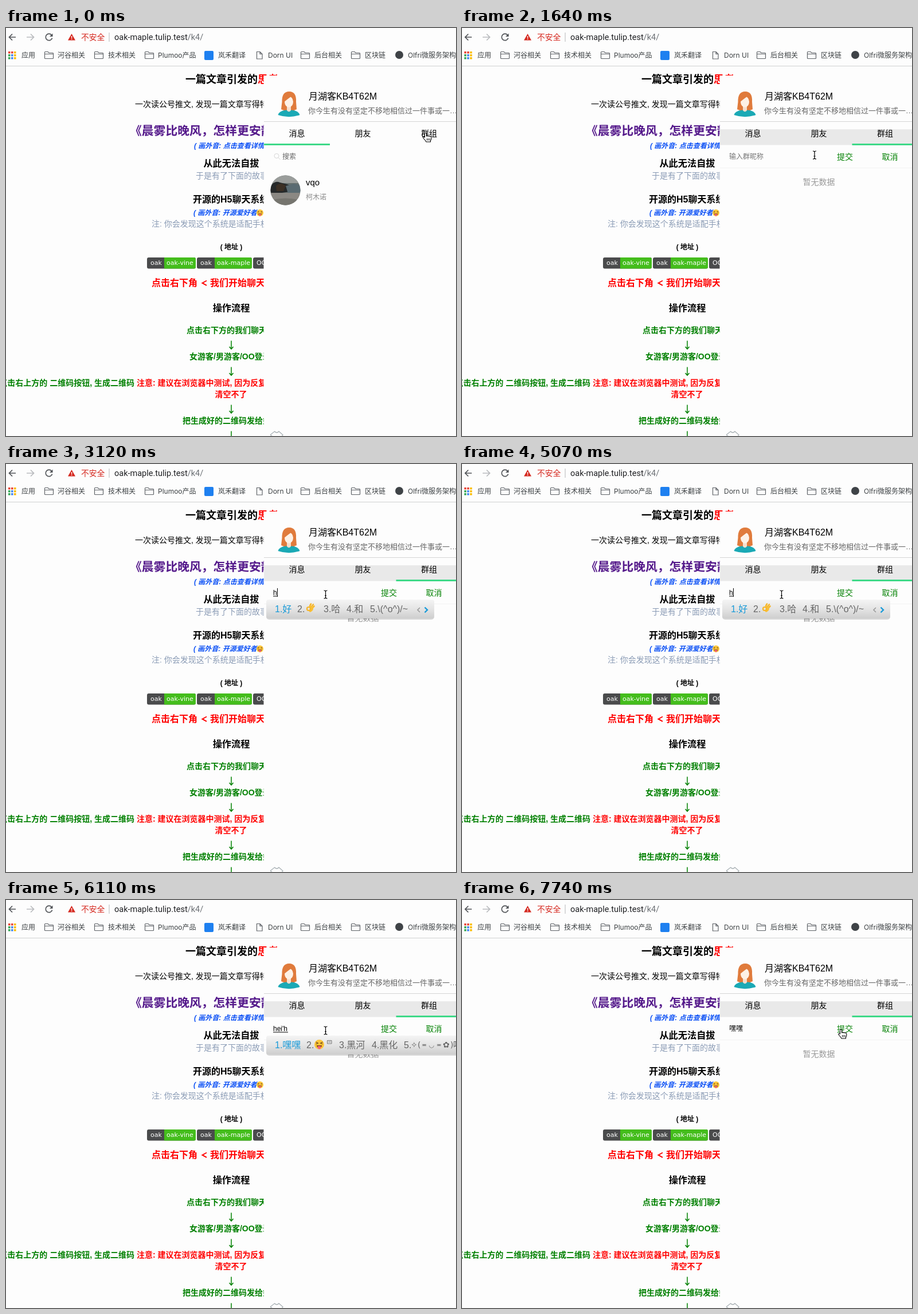
Animation of 785 by 713 pixels, one loop 8 s. Source, as an HTML page:

```html
<!DOCTYPE html>
<html lang="zh-CN">
<head>
<meta charset="utf-8">
<title>Group chat</title>
<style>
  html, body { margin: 0; width: 100%; height: 100%; overflow: hidden; background: #fdfdfd; }
  svg { display: block; width: 785px; height: 713px;
    font-family: "Liberation Sans", "Noto Sans CJK SC", "Noto Sans CJK", sans-serif; }
</style>
</head>
<body>
<svg id="stage" viewBox="0 0 785 713" xmlns="http://www.w3.org/2000/svg"></svg>
<script>
const LOOP = 8000;
const GREEN = '#008000', RED = '#ff0000', BLUE = '#0a4ff5', SLATE = '#8a9bb5';
const font = name => `font-family="${name}, Noto Sans CJK SC, Noto Sans CJK, sans-serif"`;
const BOLD = 'font-weight="700"', MID = 'text-anchor="middle"';

// Text placed by its left edge (or middle) and vertical centre.
const text = (x, cy, size, str, fill = '#000', extra = '') =>
  `<text x="${x}" y="${(cy + size * 0.34).toFixed(1)}" font-size="${size}" fill="${fill}" ${extra}>${str}</text>`;
const bold = (x, cy, size, str, fill, extra = '') => text(x, cy, size, str, fill, `${BOLD} ${extra}`);
const rect = (x, y, w, h, fill, extra = '') =>
  `<rect x="${x}" y="${y}" width="${w}" height="${h}" fill="${fill}" ${extra}/>`;
const circle = (x, y, r, fill) => `<circle cx="${x}" cy="${y}" r="${r}" fill="${fill}"/>`;
const path = (d, fill, extra = '') => `<path d="${d}" fill="${fill}" ${extra}/>`;
const line = (d, stroke, width = 1, extra = '') =>
  path(d, 'none', `stroke="${stroke}" stroke-width="${width}" ${extra}`);
const group = (id, body) => `<g id="${id}">${body}</g>`;

const folder = x =>
  line(`M${x + .5} 42.5q0-1 1-1h4.5l2 2h6.5q1 0 1 1v8q0 1-1 1h-13q-1 0-1-1zM${x + .5} 45.5h15`, '#5f6368', 1.2);

const grin = (x, y, r) => `<g transform="translate(${x} ${y}) scale(${r / 8})">` +
  circle(0, 0, 8, '#fcc63a') +
  line('M-5.500-4l3.500 1.800-3.500 1.500M5.500-4l-3.500 1.800 3.500 1.500', '#6b4516', 1) +
  path('M-4.500 1.500h9q-.8 4-4.500 4t-4.500-4z', '#80431c') +
  path('M-2.500 2.500h5v3.500q-2.500 3-5 0z', '#f2637a') + '</g>';

const okHand = (x, y) =>
  line(`M${x - 1} ${y - 4}l2-3.5M${x + 2} ${y - 3}l3-3.5M${x + 4} ${y - 1}l2.5-2.5`, '#f6b62b', 2.6, 'stroke-linecap="round"') +
  path(`M${x - 1} ${y - 5}L${x + 5} ${y - 2}Q${x + 6} ${y + 5} ${x - 1} ${y + 7}L${x - 4} ${y + 3}z`, '#f9bf35') +
  `<circle cx="${x - 3}" cy="${y + 1}" r="3" fill="#e5e5e5" stroke="#f6b62b" stroke-width="2.2"/>`;

function toolbar() {
  const appColors = ['#ea4335', '#ea4335', '#fbbc05', '#34a853', '#4285f4', '#fbbc05', '#34a853', '#4285f4', '#fbbc05'];
  const apps = appColors.map((c, i) => rect(4 + i % 3 * 5, 41 + Math.floor(i / 3) * 5, 3.5, 3.5, c)).join('');
  const label = (x, str) => text(x, 47.5, 12, str, '#3c4043', font('Inter'));
  return rect(0, 0, 785, 67, '#fdfdfd') +
    line('M17 16H6M11 10.5L5.5 16l5.5 5.5', '#505357', 1.7) +
    line('M36 16h12M43 10.5l5.5 5.5-5.5 5.5', '#b9bbbe', 1.7) +
    line('M79.5 12.2A5.8 5.8 0 1 0 80.6 17.5', '#505357', 1.7) + path('M81.5 9.5v5.5h-5.5z', '#505357') +
    path('M114.5 10l6.5 11.5h-13z', '#d5281f') + rect(113.8, 14, 1.5, 3.6, '#fff') + rect(113.8, 18.6, 1.5, 1.4, '#fff') +
    text(131, 16, 13.8, '不安全', '#d5281f') + rect(179.5, 8, 1, 16, '#b5b7ba') +
    text(189, 16, 14.5, 'oak-maple.tulip.test<tspan fill="#6b6f74">/k4/</tspan>', '#202124', font('Roboto')) +
    apps + label(27, '应用') +
    [67, 154, 242, 514, 602].map(folder).join('') +
    label(90, '河谷相关') + label(178, '技术相关') + label(265, 'Plumoo产品') +
    rect(346, 40, 16, 16, '#1e80f0', 'rx="2"') + label(370, '岚禾翻译') +
    line('M437.5 41.5h5.5l4 4v8.5h-9.5zM443 41.5v4h4', '#5f6368', 1.2) + label(457, 'Dorn UI') +
    label(538, '后台相关') + label(626, '区块链') +
    circle(686, 47, 7, '#3f4347') + label(701, 'Olfri微服务架构') +
    rect(0, 66, 785, 1, '#cfd0d1');
}

function badge(x, split, end, left, right) {
  const label = (tx, str) => text(tx, 410.5, 11, str, '#fff', font('DejaVu Sans'));
  return rect(x, 401, end - x, 19.5, '#4a4b4c', 'rx="3"') +
    (split < end ? path(`M${split} 401H${end - 3}q3 0 3 3v13.5q0 3-3 3H${split}z`, '#44bd1c') : '') +
    label(x + 6, left) + label(split + 4, right);
}

function article() {
  const down = y => line(`M393 ${y - 7.5}v14M389.5 ${y + 3}l3.5 4 3.5-4`, GREEN, 1.5);
  const italic = 'font-style="italic"';
  return bold(313, 90, 18, `一篇文章引发的<tspan fill="${RED}">思考</tspan>`) +
    text(225, 133, 14, '一次读公号推文, 发现一篇文章写得特别') +
    bold(216, 180, 20.8, '《晨雾比晚风，怎样更安静', '#551a8b') +
    bold(328, 206, 12, '( 画外音: 点击查看详情 )', BLUE, italic) +
    bold(393, 236, 16.2, '从此无法自拔', '#000', MID) +
    text(331, 258, 14, '于是有了下面的故事', SLATE) +
    bold(326, 300, 16, '开源的H5聊天系统') +
    bold(327, 323, 12, '( 画外音: 开源爱好者', BLUE, italic) + grin(443, 323, 6) +
    text(254, 342, 14, '注: 你会发现这个系统是适配手机', SLATE) +
    bold(393, 383, 12, '( 地址 )', '#000', MID) +
    badge(246, 276, 331, 'oak', 'oak-vine') + badge(333, 364, 429, 'oak', 'oak-maple') + badge(431, 490, 490, 'OO群', '') +
    bold(254, 446, 16, '点击右下角', RED) + line('M350 441.5l-7.5 4.2 7.5 4.2', RED, 2) + bold(356, 446, 16, '我们开始聊天', RED) +
    bold(393, 489, 16.2, '操作流程', '#000', MID) +
    bold(315, 528, 14, '点击右下方的我们聊天', GREEN) + down(554) +
    bold(320, 574, 14, '女游客/男游客/OO登录', GREEN) + down(600) +
    bold(224, 620, 14, '点击右上方的 二维码按钮, 生成二维码', GREEN, 'text-anchor="end"') +
    bold(228, 620, 14, '注意: 建议在浏览器中测试, 因为反复', RED) +
    bold(392.5, 640, 14, '清空不了', RED, MID) + down(666) +
    bold(308, 686, 14, '把生成好的二维码发给好友', GREEN) + down(712);
}

function userAvatar() {
  return path('M481.5 129Q481 111 494 111T506 129L507 142Q500 146 493.5 144 487 146 480 142z', '#e07b3c') +
    path('M474.5 152Q476 145 488 143.5H499Q511 145 512.5 152 493.5 158.5 474.5 152z', '#1aa9b5') +
    path('M490 136h7v8q-3.5 4.5-7 0z', '#f6dfcd') +
    '<ellipse cx="493.5" cy="129" rx="7.5" ry="9.5" fill="#fdf1e6"/>' +
    path('M485.5 129Q486 115 494 115T501.5 129Q500 122 497 120 490 125 485.5 129z', '#e07b3c');
}

function photo() {
  return '<clipPath id="round"><circle cx="487.5" cy="283.5" r="26"/></clipPath><g clip-path="url(#round)">' +
    rect(461, 257, 53, 53, '#66706f') + rect(461, 257, 53, 14, '#9a9d9b') +
    path('M461 279q6-14 17-9l12 3 13 5-8 8-34 5z', '#26292a') +
    path('M471 276q8-8 17 0l-4 9h-12z', '#3c3025') +
    path('M488 276l14-4 12 3v14h-22z', '#5a6b72') +
    rect(461, 288, 53, 22, '#8b8883') + path('M461 301q26-7 53 0v10h-53z', '#76756f') + '</g>';
}

function panel() {
  const tab = (x, str, id) => text(x, 184, 14, str, '#000', `${MID} id="${id}"`);
  const green = (x, str) => text(x, 225, 14, str, GREEN, MID);
  return rect(449.5, 83, 336, 630, '#fdfdfd') + userAvatar() +
    text(528, 120, 16, '月湖客KB4T62M') + text(527, 144.5, 13, '你今生有没有坚定不移地相信过一件事或一…', '#666') +
    rect(450, 163, 335, 1, '#d4d4d4') +
    rect(450, 177, 335, 27.5, '#e9e9e9', 'id="band"') +
    tab(507.5, '消息', 'tabNews') + tab(622.5, '朋友', 'tabFriends') + tab(738, '群组', 'tabGroups') +
    rect(450, 202, 115, 3, '#3fd988', 'id="mark"') +
    group('news',
      '<circle cx="472" cy="223.5" r="4" fill="none" stroke="#d6d6d6"/>' + line('M475 226.5l3.5 3.5', '#d6d6d6') +
      text(482, 225, 12, '搜索', '#666') + photo() + text(523, 270, 15, 'vqo') + text(523, 296, 12, '柯木诺', '#8b8b8b')) +
    group('groups', rect(450, 244, 335, 1, '#f3f3f3') + text(622.5, 269.5, 14, '暂无数据', '#999', MID)) +
    group('create', green(622.5, '新建')) +
    group('form', green(668, '提交') + green(746.5, '取消') +
      text(466, 225, 12, '输入群昵称', '#757575', 'id="hint"') + text(466, 225, 12, '', '#000', 'id="field"') +
      rect(466, 230.5, 1, 1, '#000', 'id="underline"') + rect(466, 217, 1, 15, '#000', 'id="caret"')) +
    line('M461 711l7.5-6q4 4 7.5 0l7 6-3 4M461 711l4 3', '#a9b1b5', 1.3);
}

// Input-method choices: each item is [x, label]; the first is highlighted.
function choices(id, items, extra = '') {
  return group(id, items.map(([x, str], i) => text(x, 253.5, 16, str, i ? '#666' : '#189ad8')).join('') + extra);
}

function inputBar() {
  const deco = (x, size, str) => text(x, 253.5, size, str, '#666', font('DejaVu Sans'));
  return group('bar',
    rect(454, 239, 293, 33, '#000', 'rx="5" opacity=".14" id="barShade"') +
    rect(454, 237, 293, 33, 'url(#metal)', 'rx="4" id="barBody"') +
    choices('h', [[469, '1.好'], [508, '2.'], [554, '3.哈'], [594, '4.和'], [635, '5.\\(^o^)/~']], okHand(531, 252)) +
    choices('he', [[469, '1.和'], [508, '2.喝'], [548, '3.河'], [588, '4.合'], [628, '5.何']]) +
    choices('hei', [[469, '1.黑'], [508, '2.嘿'], [548, '3.嗨'], [588, '4.黑色'], [644, '5.黑暗']]) +
    choices('heih', [[469, '1.嘿嘿'], [524, '2.'], [581, '3.黑河'], [638, '4.黑化'], [694, '5.']],
      grin(546.5, 252.5, 8.5) + line('M560.5 245.5h7.5v5.5h-7.5zM562 248h4.5', '#777') +
      deco(706, 14, '✧') + deco(718, 14, '(') + deco(725, 11, '≖ ◡ ≖') + deco(762, 14, '✿') + deco(775, 14, ')') + deco(780, 16, '嘿')) +
    group('pager', line('M722 251l-4 4 4 4', '#999', 1.6) + line('M730.5 250.5l4.500 4.5-4.5 4.5', '#189ad8', 2.4)));
}

function cursors() {
  const ink = 'stroke="#000" stroke-width="1.1" stroke-linejoin="round"';
  const beam = 'M-3-7Q0-7 0-5Q0-7 3-7M0-5V5M-3 7Q0 7 0 5Q0 7 3 7M-1.5 2H1.5';
  return group('hand',
      path('M-1.5 8V1.5Q-1.5 0 0 0T1.5 1.5V6Q3 4.8 4.5 6Q6 5 7.3 6.5Q9.8 6 9.8 8V11L8.5 14V16H1L-.5 13.5-4 9.5Q-4.8 7.5-3 7.5z', '#fff', ink) +
      line('M2.5 10v3.5M4.7 10v3.5M6.9 10v3.5', '#000', .9)) +
    group('beam', line(beam, '#fff', 2.6) + line(beam, '#000', 1.2)) +
    group('arrow', path('M0 0V14L3.2 11 5.5 16 7.7 15 5.5 10.2H10z', '#000', 'stroke="#fff"'));
}

const stage = document.getElementById('stage');
stage.innerHTML = '<defs><linearGradient id="metal" x2="0" y2="1"><stop stop-color="#f4f4f4"/>' +
  '<stop offset=".5" stop-color="#e4e4e4"/><stop offset="1" stop-color="#cecece"/></linearGradient></defs>' +
  article() + panel() + inputBar() + toolbar() + cursors();

const parts = Object.fromEntries([...stage.querySelectorAll('[id]')].map(el => [el.id, el]));
const show = (id, on) => parts[id].setAttribute('visibility', on ? 'inherit' : 'hidden');
const set = (id, attrs) => Object.entries(attrs).forEach(([k, v]) => parts[id].setAttribute(k, v));
const at = (steps, t) => steps.reduce((last, step) => step[0] <= t ? step : last);

const POINTER = [
  [0, 'hand', 732, 183], [300, 'hand', 722, 183],
  [900, 'hand', 703, 195], [1040, 'hand', 661, 210], [1190, 'hand', 629, 219], [1340, 'hand', 617, 222],
  [1640, 'beam', 615, 222], [1940, 'beam', 592, 226], [2080, 'beam', 568, 228], [2230, 'beam', 557.5, 228],
  [7000, 'beam', 565, 228], [7150, 'beam', 588, 230], [7300, 'beam', 616, 231],
  [7440, 'arrow', 644, 229], [7590, 'hand', 657, 228], [7740, 'hand', 661, 226]
];
// Time, field text, candidate list, underline width.
const TYPING = [
  [0, '', '', 0], [3120, 'h', 'h', 7], [5220, 'he', 'he', 13], [5520, 'hei', 'hei', 16],
  [5810, "hei'h", 'heih', 26], [6260, '嘿嘿', '', 0]
];
// Time and caret position; zero hides it.
const CARET = [
  [0, 0], [2230, 466], [2670, 0], [3120, 473], [3570, 0], [4170, 473], [4620, 0], [5070, 473],
  [5220, 479], [5520, 482], [5810, 491], [6110, 0], [6260, 490], [6710, 0], [7000, 490], [7440, 0]
];
const TAB_FADE = [[0, 1], [300, .45], [600, .42], [900, .75], [1040, 1]];

function render(t) {
  const onGroups = t >= 600, editing = t >= 1640;
  const fade = at(TAB_FADE, t)[1];
  show('news', !onGroups);
  show('groups', onGroups);
  show('band', onGroups);
  show('create', onGroups && !editing);
  show('form', editing);
  set('tabGroups', { opacity: fade });
  set('mark', { x: onGroups ? 680.5 : 450, opacity: onGroups ? Math.min(1, fade + .1) : 1 });

  const [, value, list, width] = at(TYPING, t);
  const caret = at(CARET, t)[1];
  parts.field.textContent = value;
  show('hint', editing && !value);
  set('underline', { width });
  show('caret', editing && caret);
  set('caret', { x: caret || 466 });

  const wide = list === 'heih';
  show('bar', list);
  ['h', 'he', 'hei', 'heih'].forEach(id => show(id, list === id));
  show('pager', list && !wide);
  ['barBody', 'barShade'].forEach(id => set(id, { width: wide ? 345 : 293 }));

  const [, shape, x, y] = at(POINTER, t);
  ['hand', 'beam', 'arrow'].forEach(id => show(id, id === shape));
  set(shape, { transform: `translate(${x} ${y})` });
}

function tick() {
  render(performance.now() % LOOP);
  requestAnimationFrame(tick);
}
tick();
</script>
</body>
</html>
```
